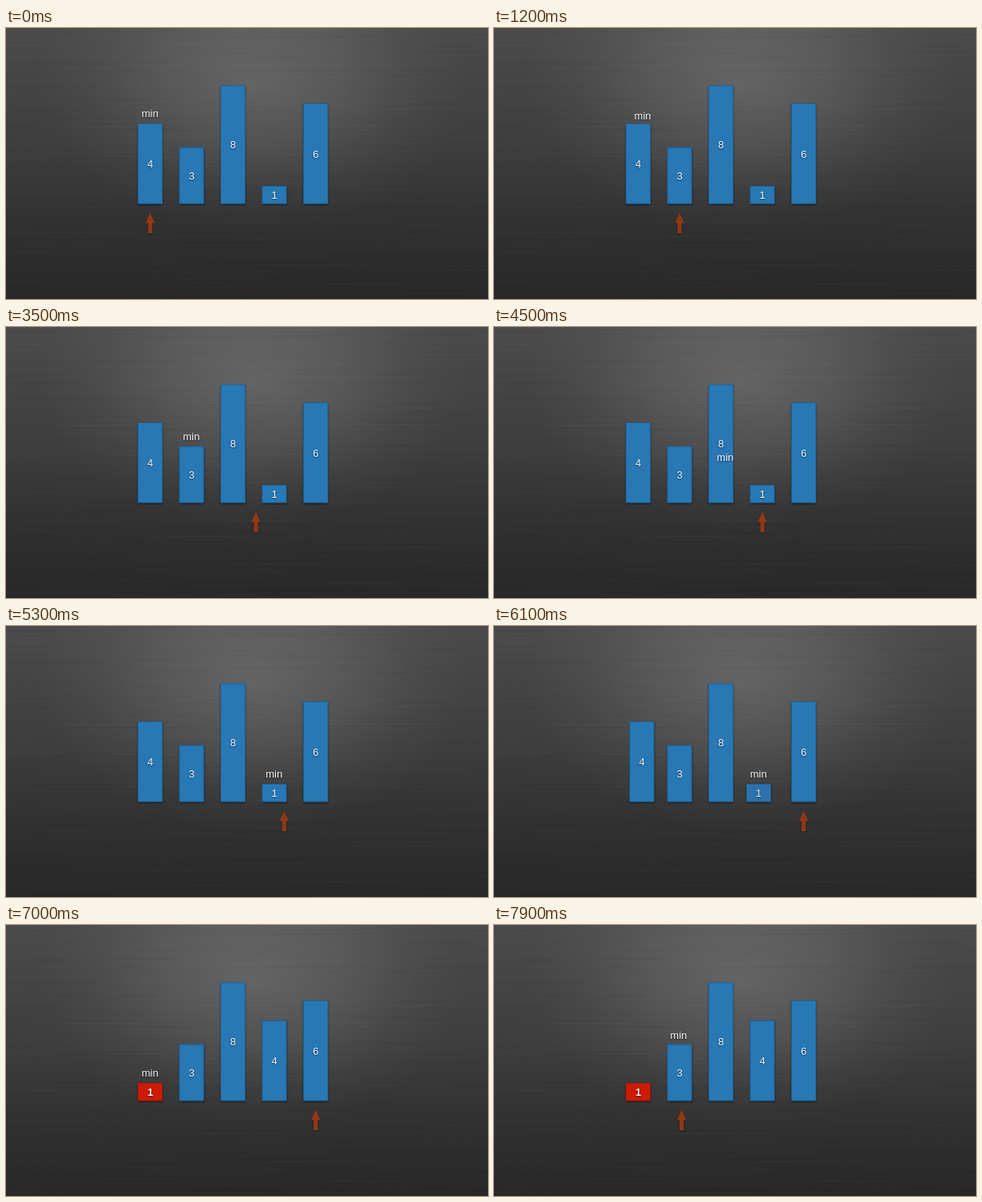
An HTML page with a canvas that plays this animation: 600 by 338 pixels, repeating every 8 s.

```html
<!DOCTYPE html>
<html lang="en">
<head>
<meta charset="utf-8">
<title>Selection sort</title>
<style>
  html, body { margin: 0; width: 100%; height: 100%; overflow: hidden; background: #333; }
  canvas { display: block; width: 600px; height: 338px; }
</style>
</head>
<body>
<canvas id="stage" width="600" height="338"></canvas>
<script>
const W = 600, H = 338, LOOP = 8000, STEP = 1000, TICK = 100;
const BASE = 219.5, BAR_W = 31;
const BLUE = '#2878b5', RED = '#cd1b05';
const ctx = document.getElementById('stage').getContext('2d');
const slotX = i => 179.5 + 51.5 * i;
const tops = { 4: 119, 3: 148.7, 8: 71.5, 1: 197, 6: 94 };
const order = [4, 3, 8, 1, 6];

// State at each whole second: arrow slot, slot and bar that "min" sits on
const states = [
  { arrow: 0, min: 0, on: 4 },
  { arrow: 1, min: 0, on: 4 },
  { arrow: 1, min: 1, on: 3 },
  { arrow: 2, min: 1, on: 3 },
  { arrow: 3, min: 1, on: 3 },
  { arrow: 3, min: 3, on: 1 },
  { arrow: 4, min: 3, on: 1 },
  { arrow: 4, min: 0, on: 1 },
  { arrow: 1, min: 1, on: 3 }
];
const SWAP = 6;

const lerp = (a, b, p) => a + (b - a) * p;

// Ease in and out, a little ahead of the middle
function ease(t) {
  const u = t + 0.29 * t * t * (1 - t);
  return u * u * (3 - 2 * u);
}

function makeBackground() {
  const c = document.createElement('canvas');
  c.width = W;
  c.height = H;
  const g = c.getContext('2d');
  const down = g.createLinearGradient(0, 0, 0, H);
  down.addColorStop(0, '#4b4b4b');
  down.addColorStop(0.45, '#3d3d3d');
  down.addColorStop(0.75, '#303030');
  down.addColorStop(1, '#282828');
  g.fillStyle = down;
  g.fillRect(0, 0, W, H);

  g.save();
  g.translate(308, 70);
  g.scale(1.45, 1);
  const glow = g.createRadialGradient(0, 0, 0, 0, 0, 185);
  glow.addColorStop(0, 'rgba(255,255,255,0.17)');
  glow.addColorStop(0.4, 'rgba(255,255,255,0.105)');
  glow.addColorStop(0.75, 'rgba(255,255,255,0.03)');
  glow.addColorStop(1, 'rgba(255,255,255,0)');
  g.fillStyle = glow;
  g.fillRect(-W, -H, 2 * W, 2 * H);
  g.restore();

  // Faint brushed streaks
  let seed = 7;
  const rnd = () => (seed = seed * 16807 % 2147483647) / 2147483647;
  for (let i = 0; i < 700; i++) {
    g.fillStyle = rnd() < 0.5 ? 'rgba(255,255,255,0.012)' : 'rgba(0,0,0,0.022)';
    g.fillRect(rnd() * W - 60, Math.floor(rnd() * H), 40 + rnd() * 150, 1);
  }
  return c;
}
const background = makeBackground();

function shadow(color, blur, y) {
  ctx.shadowColor = color;
  ctx.shadowBlur = blur;
  ctx.shadowOffsetY = y;
}

function label(text, x, y, weight = '') {
  ctx.save();
  shadow('rgba(0,0,0,0.6)', 2, 1);
  ctx.font = `${weight} 13px "Liberation Sans", Arial, sans-serif`;
  ctx.textAlign = 'center';
  ctx.fillStyle = '#f4f4f4';
  ctx.fillText(text, x, y);
  ctx.restore();
}

function bar(value, x, color, weight) {
  const top = tops[value], left = x - BAR_W / 2, h = BASE - top;
  ctx.save();
  shadow('rgba(0,0,0,0.5)', 2, 1);
  ctx.fillStyle = color;
  ctx.fillRect(left, top, BAR_W, h);
  ctx.restore();
  ctx.strokeStyle = 'rgba(0,30,60,0.22)';
  ctx.lineWidth = 1;
  ctx.strokeRect(left + 0.5, top + 0.5, BAR_W - 1, h - 1);
  label(value, x, (top + BASE) / 2 + 4.8, weight);
}

function arrow(x) {
  ctx.save();
  ctx.translate(x, 230.5);
  shadow('rgba(0,0,0,0.35)', 2, 1);
  ctx.beginPath();
  [[0, 0], [6, 13], [2.5, 13], [2.5, 25.5], [-2.5, 25.5], [-2.5, 13], [-6, 13]]
    .forEach(([px, py]) => ctx.lineTo(px, py));
  ctx.closePath();
  ctx.fillStyle = '#903914';
  ctx.fill();
  ctx.restore();
}

function draw(time) {
  const i = Math.floor(time / STEP), p = ease(time % STEP / STEP);
  const a = states[i], b = states[i + 1];
  const swap = i < SWAP ? 0 : i > SWAP ? 1 : p;

  ctx.drawImage(background, 0, 0);
  order.forEach((value, slot) => {
    const goal = value === 4 ? 3 : value === 1 ? 0 : slot;
    const x = lerp(slotX(slot), slotX(goal), swap);
    if (value !== 1 || swap < 1) bar(value, x, BLUE);
    if (value === 1 && swap > 0) {
      ctx.globalAlpha = swap;
      bar(value, x, RED, 'bold');
      ctx.globalAlpha = 1;
    }
  });
  label('min', lerp(slotX(a.min), slotX(b.min), p) - 0.3,
    lerp(tops[a.on], tops[b.on], p) - 8);
  arrow(lerp(slotX(a.arrow), slotX(b.arrow), p));
}

function frame() {
  const now = performance.now() + 2;
  draw(Math.floor(now % LOOP / TICK) * TICK);
  requestAnimationFrame(frame);
}
frame();
</script>
</body>
</html>
```
